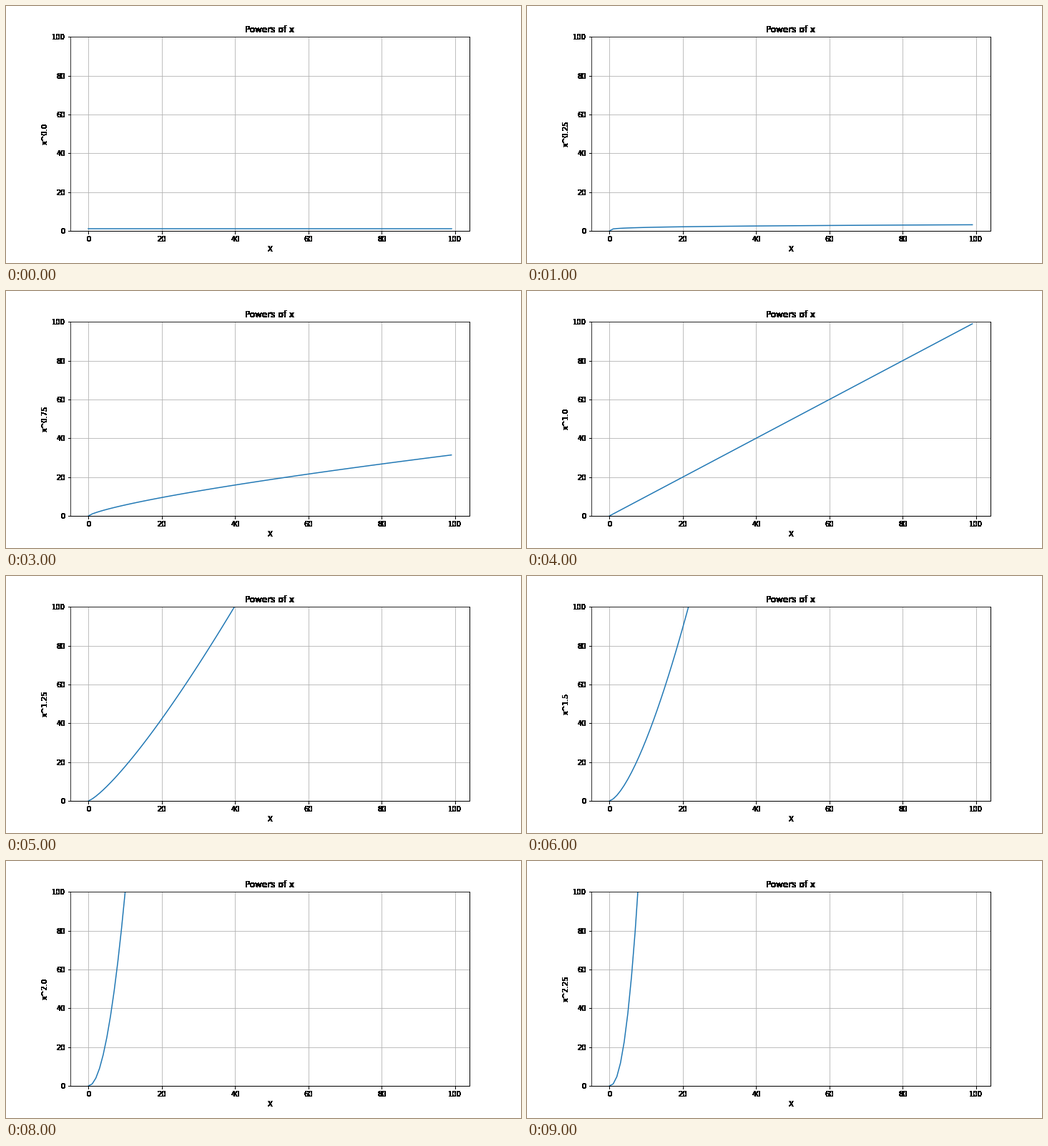
A matplotlib script that plays this animation: 720x360 px, repeating every 10 s.

```python
import numpy as np
import matplotlib.pyplot as plt
from matplotlib.animation import FuncAnimation

STEPS = 10
plt.rcParams.update({"font.family": "DejaVu Sans", "font.size": 10})


def harden_edges(img, dpi):
    """Make every touched pixel opaque, which gives the heavy, jagged text."""
    img[..., 3] = img[..., 3] > 0
    return img, 0, 0


fig, ax = plt.subplots(figsize=(10, 5), dpi=72, facecolor="white")
fig.subplots_adjust(left=0.125, right=0.9, bottom=0.125, top=0.88)
ax.set_agg_filter(harden_edges)

x = np.arange(100)
line, = ax.plot(x, np.ones(100), color="#1f77b4", lw=1.5)
ax.set(title="Powers of x", xlabel="X", xlim=(-4.95, 103.95), ylim=(0, 100))
ax.grid(True)


def update(step):
    power = step / 4
    line.set_ydata(x ** power)
    ax.set_ylabel(f"x^{power}")
    return line,


anim = FuncAnimation(fig, update, frames=STEPS, interval=1000,
                     repeat=True, repeat_delay=0, blit=False)
plt.show()
```
